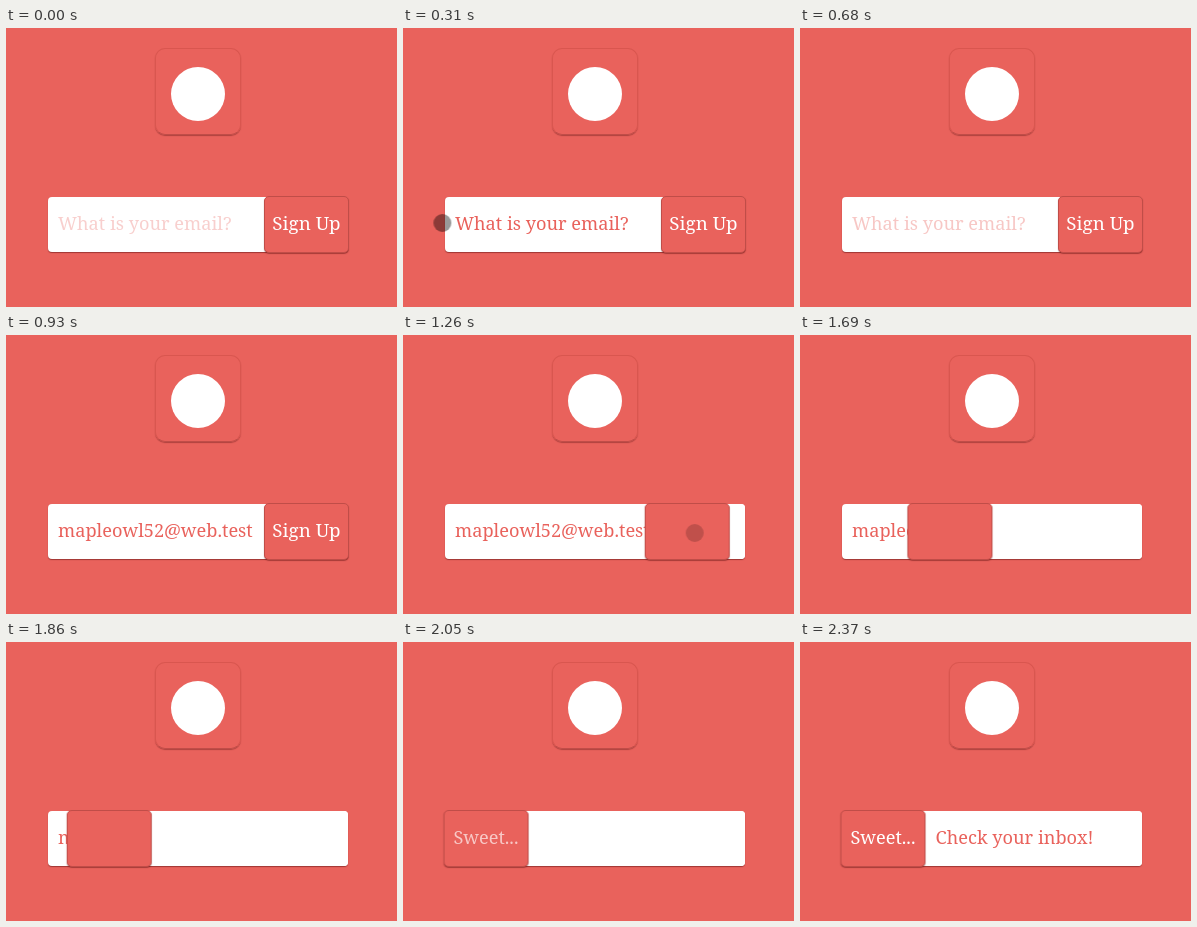
Animation of 391x279 px, one loop 3.1 s. Source, as an HTML page:

```html
<!DOCTYPE html>
<html lang="en">
<head>
<meta charset="utf-8">
<title>Slide to sign up</title>
<style>
  :root { --red: #e9625c; --edge: #c04d48; --loop: 3.1s; }
  html, body { margin: 0; width: 100%; height: 100%; overflow: hidden; background: var(--red); }
  body { position: relative; font: 18.2px/56px "Noto Serif", serif; white-space: nowrap; }
  div, span { position: absolute; box-sizing: border-box; }

  .tile {
    left: 149px; top: 20px; width: 86px; height: 87px;
    border: 1px solid #d9564f; border-bottom-color: var(--edge); border-radius: 10px;
    box-shadow: 0 1px 1px rgba(90, 20, 20, .4);
  }
  .mark { left: 15px; top: 18px; width: 54px; height: 54px; border-radius: 50%; background: #fff; }

  .field {
    left: 42px; top: 169px; width: 300px; height: 55px;
    border-radius: 4px; background: #fff; color: var(--red);
    box-shadow: 0 1px 1px rgba(110, 25, 25, .6);
  }
  .clip { inset: 0; overflow: hidden; border-radius: 4px; }
  .clip span { left: 10px; top: -2px; }
  .clip .done { left: 93.5px; }
  .cover { left: 258px; top: 0; width: 300px; height: 55px; background: #fff; }

  .button {
    left: 258px; top: 167.5px; width: 85px; height: 57px;
    border: 1px solid var(--edge); border-radius: 5px; background: var(--red); color: #fff;
    box-shadow: 0 1px 1px rgba(110, 25, 25, .5);
  }
  .button span { inset: -1.5px 0 auto; text-align: center; }
  .button .signup { font-size: 18.8px; }

  .touch { width: 18px; height: 18px; border-radius: 50%; background: #000; }
  .tap { left: -9px; top: 186px; }
  .drag { left: 40px; top: 20.5px; }

  .cover, .button { animation: slide var(--loop) infinite; }
  .prompt { animation: prompt var(--loop) linear infinite; }
  .email  { animation: email var(--loop) linear infinite; }
  .signup { animation: signup var(--loop) linear infinite; }
  .sweet  { animation: sweet var(--loop) linear infinite; }
  .done   { animation: done var(--loop) linear infinite; }
  .tap    { animation: tap-move var(--loop) infinite, tap-fade var(--loop) linear infinite; }
  .drag   { animation: drag var(--loop) linear infinite; }

  @keyframes slide {
    0%, 35.16% { transform: none; animation-timing-function: cubic-bezier(.37, 0, .63, 1); }
    66.2%, 100% { transform: translateX(-217.5px); }
  }
  @keyframes prompt {
    0% { opacity: .3; }
    6.5%, 18.4% { opacity: 1; }
    21.94% { opacity: .36; }
    24%, 100% { opacity: 0; }
  }
  @keyframes email { 0%, 23% { opacity: 0; } 30%, 100% { opacity: 1; } }
  @keyframes signup { 0%, 35.16% { opacity: 1; } 40%, 100% { opacity: 0; } }
  @keyframes sweet { 0%, 62% { opacity: 0; } 66.13% { opacity: .65; } 69.7%, 100% { opacity: 1; } }
  @keyframes done { 0%, 67.7% { opacity: 0; } 76.4%, 100% { opacity: 1; } }
  @keyframes tap-move {
    0%, 2% { transform: translateX(-9px); animation-timing-function: linear; }
    10% { transform: translateX(39px); animation-timing-function: ease-out; }
    17%, 100% { transform: translateX(88px); }
  }
  @keyframes tap-fade {
    0% { opacity: 0; }
    4%, 13% { opacity: .4; }
    17.8%, 100% { opacity: 0; }
  }
  @keyframes drag {
    0%, 35.16% { opacity: 0; }
    38% { opacity: .3; }
    40.65% { opacity: .18; }
    45%, 100% { opacity: 0; }
  }
</style>
</head>
<body>
  <div class="tile"><div class="mark"></div></div>
  <div class="field">
    <div class="clip">
      <span class="prompt">What is your email?</span>
      <span class="email">mapleowl52@web.test</span>
      <div class="cover"></div>
      <span class="done">Check your inbox!</span>
    </div>
  </div>
  <div class="button">
    <span class="signup">Sign Up</span>
    <span class="sweet">Sweet...</span>
    <div class="touch drag"></div>
  </div>
  <div class="touch tap"></div>
</body>
</html>
```
